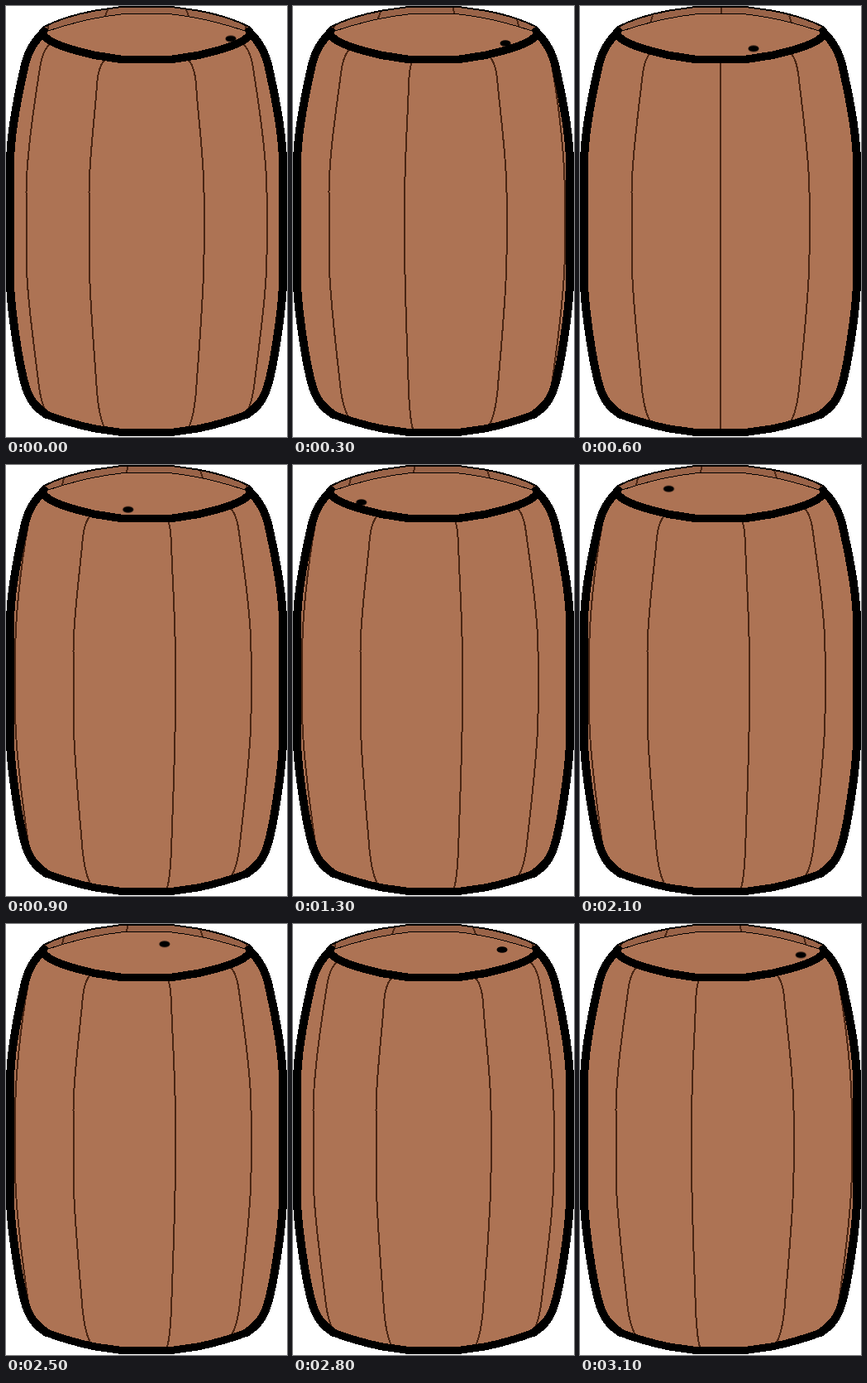
An HTML page without scripts that plays this animation: 340x520 px, repeating every 3200 ms.

```html
<!DOCTYPE html>
<html lang="en">
<head>
<meta charset="utf-8">
<title>Rolling barrel</title>
<style>
  html, body { margin: 0; width: 100%; height: 100%; overflow: hidden; background: #fff; }
  svg { display: block; width: 340px; height: 520px; shape-rendering: crispEdges; }
  .wood { fill: #ad7354; }
  .ink { fill: none; stroke: #000; stroke-linejoin: round; stroke-linecap: round; }
  .seams path { fill: none; stroke: #4a2614; stroke-width: 2; }

  /* Each seam crosses the barrel in five 400 ms legs of four steps. */
  .seams path { animation: 2s steps(4, end) calc(var(--leg) * -400ms) infinite; }
  .front path { animation-name: front; }
  .back path { animation-name: back; }
  .knob { animation: orbit 3.2s steps(4, end) infinite; shape-rendering: geometricPrecision; }

  @keyframes front {
    0%   { d: path("M322 20 Q346 30 356 65 C370 125 368.5 185 368.5 225 L368.5 300 C368.5 345 361 410 350 460 Q330 490 312 500"); }
    20%  { d: path("M287 46 Q296 54 299 75 C307 125 315.5 185 315.5 225 L315.5 300 C315.5 345 306 410 300 460 Q296 486 288 494"); }
    40%  { d: path("M219 64 Q228 70 230 95 C233 140 239.5 185 239.5 225 L239.5 300 C239.5 345 233 420 230 465 Q227 500 219 512"); }
    60%  { d: path("M121 64 Q112 70 110 95 C107 140 100.5 185 100.5 225 L100.5 300 C100.5 345 107 420 110 465 Q113 500 121 512"); }
    80%  { d: path("M53 46 Q44 54 41 75 C33 125 24.5 185 24.5 225 L24.5 300 C24.5 345 34 410 40 460 Q44 486 52 494"); }
    100% { d: path("M18 20 Q-6 30 -16 65 C-30 125 -28.5 185 -28.5 225 L-28.5 300 C-28.5 345 -21 410 -10 460 Q10 490 28 500"); }
  }
  @keyframes back {
    0%   { d: path("M45 25 L44 32"); }
    20%  { d: path("M52 21 L50 30"); }
    40%  { d: path("M124 2 L120 12"); }
    60%  { d: path("M217 2 L221 12"); }
    80%  { d: path("M289 21 L291 30"); }
    100% { d: path("M296 25 L297 32"); }
  }
  @keyframes orbit {
    0%, 100% { transform: translate(272px, 39.5px); }
    12.5%    { transform: translate(252px, 46.8px); }
    25%      { transform: translate(168px, 56px); }
    37.5%    { transform: translate(87px, 47px); }
    50%      { transform: translate(70px, 39.5px); }
    62.5%    { transform: translate(86px, 31px); }
    75%      { transform: translate(171.5px, 22px); }
    87.5%    { transform: translate(253px, 31px); }
  }
</style>
</head>
<body>
<svg viewBox="0 0 340 520">
  <defs>
    <path id="side" d="M45 32 C34 43 26 55 22 75 Q5 150 5 190 V330 C5 360 16 440 26 466 Q32 482 49 493"/>
    <path id="base" d="M49 493 Q75 503 108 510 L140 514.5 H200 L232 510 Q265 503 291 493"/>
    <path id="body" d="M45 32 C34 43 26 55 22 75 Q5 150 5 190 V330 C5 360 16 440 26 466 Q32 482 49 493 Q75 503 108 510 L140 514.5 H200 L232 510 Q265 503 291 493 Q308 482 314 466 C324 440 335 360 335 330 V190 Q335 150 318 75 C314 55 306 43 295 32 Z"/>
    <path id="brim" d="M46 30 Q44 34 48 38 Q60 49 108 59.5 L140 64.5 H200 L232 59.5 Q280 49 292 38 Q296 34 294 30"/>
    <path id="rim" d="M46 25 Q72 12 108 5.5 L140 1 H200 L232 5.5 Q268 12 294 25"/>
    <path id="lid" d="M48 31 Q98 14 143 9.5 H197 Q242 14 292 31"/>
    <clipPath id="inside"><use href="#body"/></clipPath>
    <clipPath id="mouth"><path d="M46 25 Q72 12 108 5.5 L140 1 H200 L232 5.5 Q268 12 294 25 V32 Q242 14 197 10 H143 Q98 14 46 32 Z"/></clipPath>
  </defs>

  <use href="#body" class="wood"/>
  <g class="seams front" clip-path="url(#inside)">
    <path style="--leg:0"/>
    <path style="--leg:1"/>
    <path style="--leg:2"/>
    <path style="--leg:3"/>
    <path style="--leg:4"/>
  </g>
  <g class="ink" stroke-width="10">
    <use href="#side"/>
    <use href="#side" transform="matrix(-1 0 0 1 340 0)"/>
    <use href="#base" stroke-width="9"/>
  </g>

  <use href="#rim" fill="#996348"/>
  <path d="M46 25 H294 V36 H46 Z" fill="#996348"/>
  <path class="wood" d="M48 31 Q98 14 143 9.5 H197 Q242 14 292 31 V38 Q280 49 232 59.5 L200 64.5 H140 L108 59.5 Q60 49 48 38 Z"/>
  <g class="seams back" clip-path="url(#mouth)">
    <path style="--leg:0"/>
    <path style="--leg:1"/>
    <path style="--leg:2"/>
    <path style="--leg:3"/>
    <path style="--leg:4"/>
  </g>
  <use href="#lid" class="ink" stroke-width="1"/>
  <use href="#rim" class="ink" stroke-width="2"/>
  <use href="#brim" class="ink" stroke-width="9.5"/>
  <ellipse class="knob" rx="6.5" ry="3.8"/>
</svg>
</body>
</html>
```
